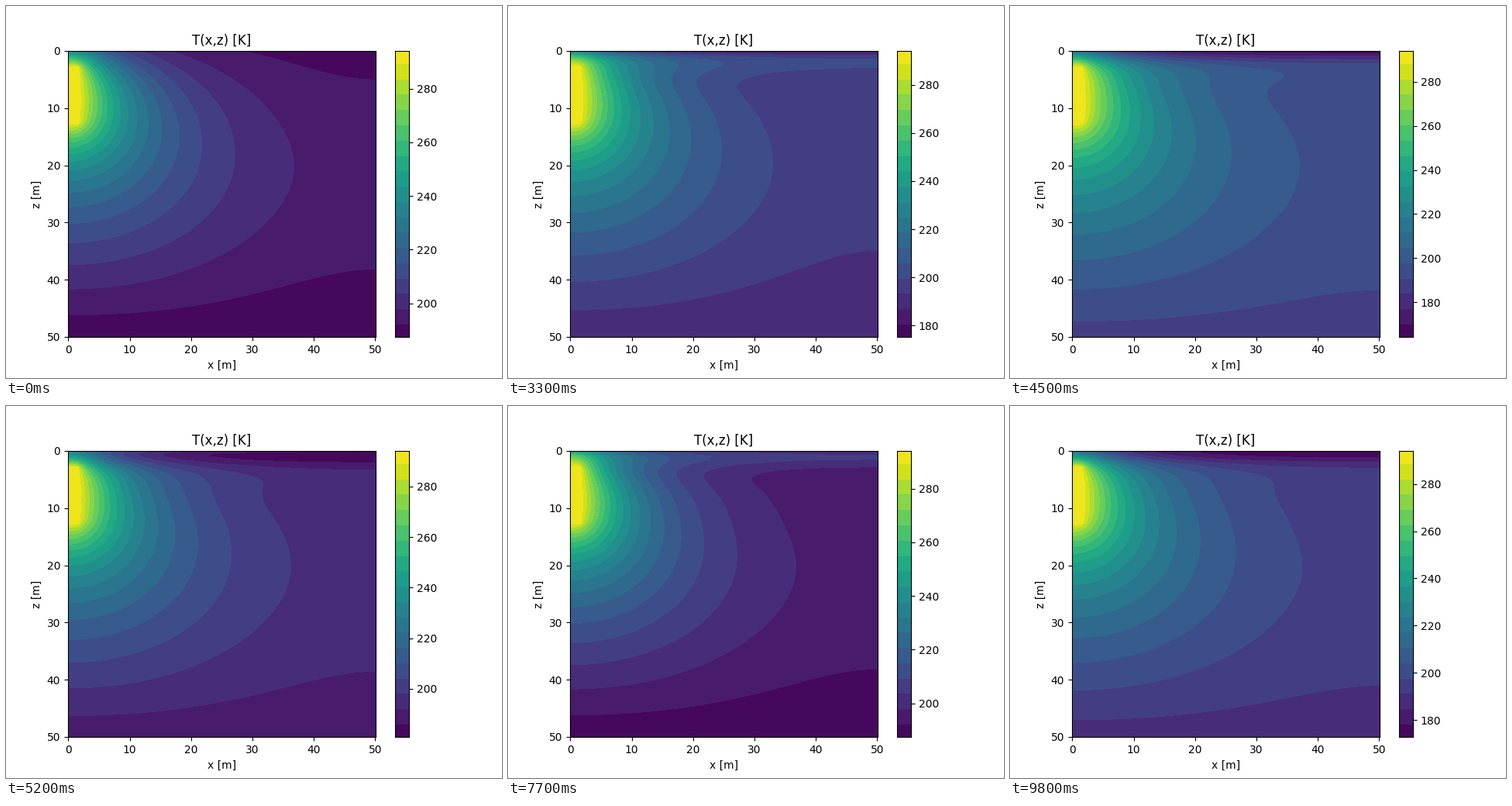
Write a matplotlib script that moves like this. It is 640 px wide and 480 px high and loops after 9900 ms.

```python
import numpy as np
import matplotlib.pyplot as plt
from matplotlib.animation import FuncAnimation
from matplotlib.ticker import MultipleLocator

FRAMES, INTERVAL = 99, 100
SIZE, STEP = 50.0, 0.5           # domain and grid spacing in metres
VIEW = (-0.05, 50.05)            # plotted range of both axes
HOT, BOTTOM = 294.15, 187.4      # fixed temperatures in kelvin
AIR, SWING, YEAR = 188.5, 119.0, FRAMES / 2   # seasonal forcing at the surface
FILM = 3.45 / STEP               # surface exchange length in cells
SUBSTEPS, FOURIER = 3, 0.19      # time steps per frame, diffusion number

# Colour band edges as fractions of the current range
EDGES = np.concatenate([[0], np.linspace(0.044, 0.953, 18), [1]])
COLORS = plt.get_cmap("viridis")((EDGES[:-1] + EDGES[1:]) / 2)

axis = np.arange(0, SIZE + STEP / 2, STEP)
X, Z = np.meshgrid(axis, axis)
HEATER = (X <= 1.5) & (Z >= 3) & (Z <= 12.5)
FREE = ~HEATER
FREE[0] = FREE[-1] = False
drawn_axis = np.linspace(*VIEW, len(axis))


def neighbours(T):
    """Mean of the four neighbours with insulated side walls."""
    P = np.pad(T, 1, mode="reflect")
    return (P[:-2, 1:-1] + P[2:, 1:-1] + P[1:-1, :-2] + P[1:-1, 2:]) / 4


def apply_surface(T, t):
    air = AIR + SWING * np.sin(2 * np.pi * t / YEAR)
    T[0] = (FILM * T[1] + air) / (1 + FILM)


def steady_state():
    """Red-black over-relaxation to the state before the first season."""
    T = np.full(X.shape, 195.0)
    T[HEATER], T[-1] = HOT, BOTTOM
    parity = np.add.outer(np.arange(len(axis)), np.arange(len(axis))) % 2
    cells = [FREE & (parity == p) for p in (0, 1)]
    for _ in range(800):
        for mask in cells:
            T += 1.93 * mask * (neighbours(T) - T)
        apply_surface(T, 0)
    return T


def simulate():
    T = steady_state()
    fields = [T.copy()]
    for n in range(FRAMES - 1):
        for s in range(1, SUBSTEPS + 1):
            T += 4 * FOURIER * FREE * (neighbours(T) - T)
            apply_surface(T, n + s / SUBSTEPS)
        fields.append(T.copy())
    return fields


fields = simulate()
fig = plt.figure(figsize=(6.4, 4.8), dpi=100)
ax = fig.add_axes([0.125, 0.11, 0.62, 0.77])
bar = fig.add_axes([0.78375, 0.11, 0.028875, 0.77])


def draw(n):
    T = fields[n]
    low, high = T.min(), T.max()
    levels = low + EDGES * (high - low)

    ax.clear()
    ax.contourf(drawn_axis, drawn_axis, np.clip(T, low + 1e-6, high - 1e-6),
                levels=levels, colors=COLORS)
    ax.set(xlim=VIEW, ylim=VIEW[::-1], xlabel="x [m]", ylabel="z [m]",
           title="T(x,z) [K]")

    bar.clear()
    bar.bar(0.5, np.diff(levels), width=1, bottom=levels[:-1], color=COLORS,
            antialiased=False)
    bar.set(xlim=(0, 1), ylim=(low, high), xticks=[])
    bar.yaxis.tick_right()
    bar.yaxis.set_major_locator(MultipleLocator(20))
    return []


anim = FuncAnimation(fig, draw, frames=FRAMES, interval=INTERVAL,
                     init_func=lambda: [], repeat=True, repeat_delay=0, blit=False)
plt.show()
```
